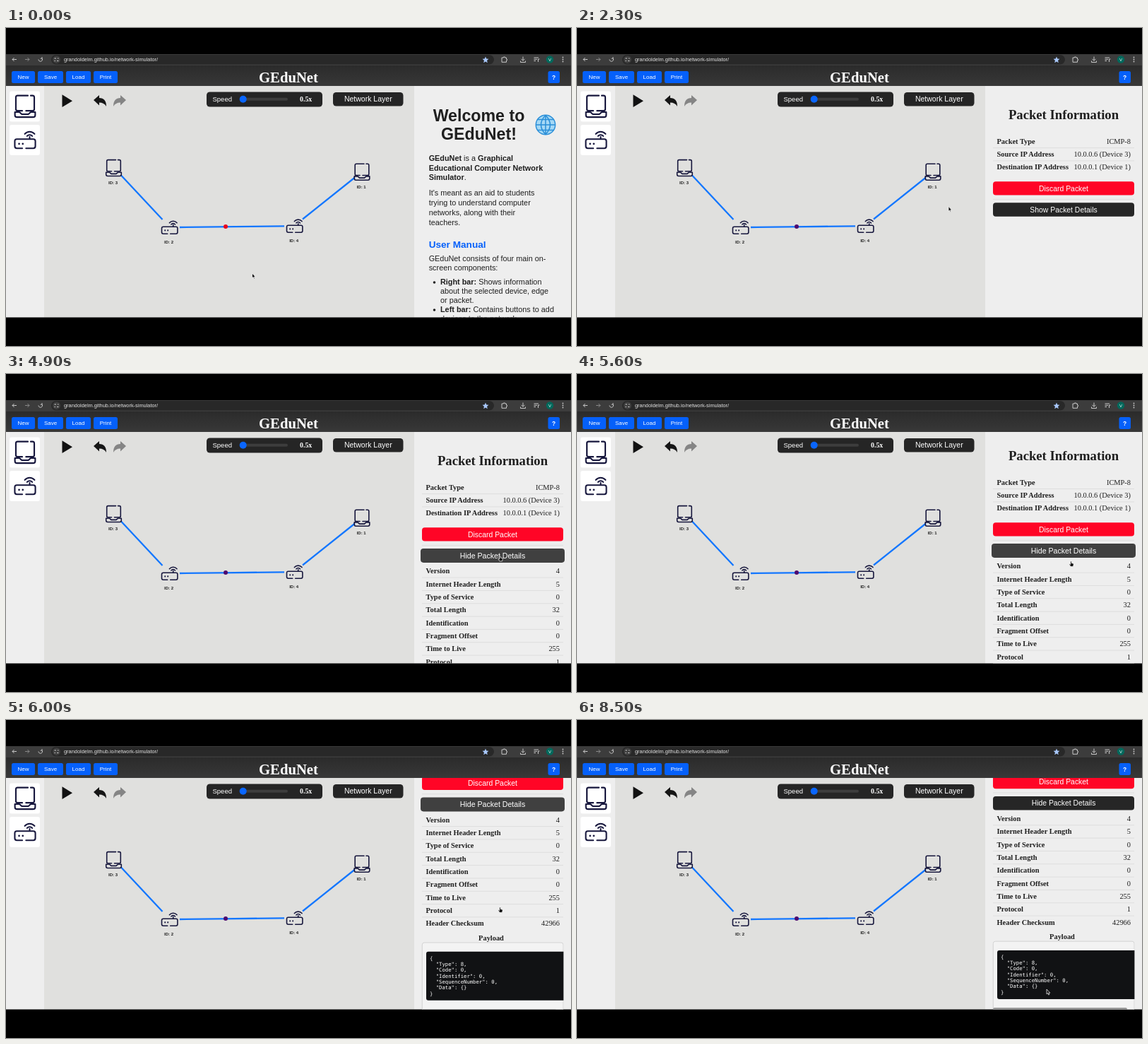
Animation of 800 by 450 pixels, one loop 9700 ms. Source, as an HTML page:

```html
<!DOCTYPE html>
<html lang="en">
<head>
<meta charset="utf-8">
<title>Network simulator</title>
<style>
  html, body { margin: 0; width: 100%; height: 100%; overflow: hidden; background: #000; }
  svg { display: block; width: 800px; height: 450px; }
  text { font-family: "Liberation Sans", Arial, sans-serif; font-size: 10.4px; fill: #1f1f1f; white-space: pre; }
  .serif { font-family: "Liberation Serif", "Times New Roman", serif; }
  .mono { font-family: "DejaVu Sans Mono", monospace; font-size: 7.25px; fill: #fff; }
  .bold { font-weight: bold; }
  .mid { text-anchor: middle; }
  .end { text-anchor: end; }
  .white { fill: #fff; }
  .body { font-size: 10.85px; }
  .icon { fill: none; stroke: #17173d; stroke-width: 1.6; stroke-linecap: round; stroke-linejoin: round; }
  .chrome { fill: none; stroke: #c7c7c7; stroke-width: 1; }
  .rule { stroke: #dadada; stroke-width: .8; }
</style>
</head>
<body>
<svg id="stage" viewBox="0 0 800 450">
  <defs>
    <linearGradient id="head" x2="0" y2="1">
      <stop stop-color="#2b2b2b"/><stop offset="1" stop-color="#383838"/>
    </linearGradient>
    <clipPath id="panelClip"><path d="M578 82H800V409.5H578Z"/></clipPath>
    <clipPath id="payloadClip"><path d="M588 440H789.4V560H588Z"/></clipPath>
    <g id="computer" class="icon">
      <path d="M-3 4.8H-8Q-9.8 4.8-9.8 3V-9.5Q-9.8-11.4-8-11.4H3M6-11.4H8Q9.8-11.4 9.8-9.5V3Q9.8 4.8 8 4.8H1"/>
      <path d="M-10.8 6.2H-6L-3.5 8.4H3.5L6 6.2H10.8V9.3Q10.8 11.5 8.6 11.5H-8.6Q-10.8 11.5-10.8 9.3Z"/>
    </g>
    <g id="router" class="icon">
      <path d="M-3 9H-9Q-11.2 9-11.2 6.8V1.2Q-11.2-1-9-1H9Q11.2-1 11.2 1.2V6.8Q11.2 9 9 9H1M5-1V-3.5"/>
      <path d="M2.2-4.3A3.6 3.6 0 0 1 7.8-4.3M-.3-6.6A7 7 0 0 1 10.3-6.6"/>
      <path d="M-6.5 4V4.2M-2.5 4V4.2" stroke-width="2"/>
    </g>
  </defs>
  <g id="app"></g>
  <g clip-path="url(#panelClip)">
    <path d="M578 82H800V410H578Z" fill="#eee"/>
    <g id="welcome"></g>
    <g id="packetInfo"></g>
  </g>
  <g id="cursor" stroke="#fff" stroke-width=".7" fill="#111" stroke-linejoin="round">
    <path id="arrow" d="M0 0V6.8L1.6 5.5L2.7 8L3.8 7.5L2.7 5.2H4.8Z"/>
    <path id="hand" d="M-.8 .6Q0-.6 .8 .6V2.6L3.6 3.2Q4 5.5 2.9 7.4H-.6L-2.6 4.2L-2 3.6L-.8 4.6Z"/>
  </g>
</svg>
<script>
const LOOP = 9700, STEP = 100;
const $ = id => document.getElementById(id);
const text = (x, y, str, cls = '', size) =>
  `<text x="${x}" y="${y}" class="${cls}"${size ? ` style="font-size:${size}px"` : ''}>${str}</text>`;
const box = (x, y, w, h, fill, r = 0, extra = '') =>
  `<rect x="${x}" y="${y}" width="${w}" height="${h}" rx="${r}" fill="${fill}" ${extra}/>`;
const path = (d, attrs) => `<path d="${d}" ${attrs}/>`;
const dot = (x, y, r, fill, extra = '') => `<circle cx="${x}" cy="${y}" r="${r}" fill="${fill}" ${extra}/>`;
const icon = (name, x, y, scale = 1) => `<use href="#${name}" transform="translate(${x} ${y}) scale(${scale})"/>`;
const rule = y => path(`M589 ${y}H789`, 'class="rule"');
const button = (x, w, label) =>
  box(x, 61, w, 17, '#0560fa', 2.5) + text(x + w / 2, 72.4, label, 'white mid', 8);

function browserBar() {
  return box(0, 37, 800, 16, '#3c3c3c') + box(64, 38, 627, 13.5, '#282828', 6.7) +
    path('M15 44.5H9M11.5 42L9 44.5L11.5 47M46 44.5A2.8 2.8 0 1 0 51 42.7V41M51 43.2H48.8', 'class="chrome"') +
    path('M27 44.5H33M30.5 42L33 44.5L30.5 47', 'class="chrome" style="stroke:#888"') +
    dot(71.5, 44.7, 5.5, '#3f3f3f') +
    path('M68.5 43H71M73 43H74.5M68.5 46.5H70M72 46.5H74.5', 'class="chrome"') +
    text(82, 47.3, 'grandoldelm.github.io/network-simulator/', '', '7.4" fill="#e3e3e3').replace('px"', '"').replace('7.4"', '7.4px;fill:#e3e3e3"').replace(' fill="#e3e3e3"', '') +
    path('M679 40.5L680.3 43.5L683.4 43.8L681 46L681.8 49.2L679 47.5L676.2 49.2L677 46L674.6 43.8L677.7 43.5Z', 'fill="#a8c7fa"') +
    path('M702 42H704.5V41H706.5V42H708.5V44H709.3V46H708.5V48.3H702ZM732 40.5V46M729.5 43.8L732 46.3L734.5 43.8M728.5 46.5V48.5H735.5V46.5M747.5 42H754M747.5 44.3H752M747.5 46.5H750M753.5 48V44H755.5', 'class="chrome"') +
    dot(770, 44.5, 5.2, '#00695c') + text(770, 46.7, 'V', 'white mid', 6) +
    [41.5, 44.5, 47.5].map(y => dot(788.5, y, .9, '#c7c7c7')).join('');
}

function header() {
  return box(0, 53, 800, 29, 'url(#head)') + button(8, 33, 'New') + button(45, 36, 'Save') +
    button(85, 35, 'Load') + button(124, 34, 'Print') +
    box(767.5, 61, 16.5, 17, '#0560fa', 2.5) + text(775.7, 72.6, '?', 'white bold mid', 8.5) +
    text(400, 76.7, 'GEduNet', 'serif bold mid white', 20.7);
}

function controls() {
  const undo = 'M124 102L132 95V99Q142 99 142 111Q139 105.5 132 105.5V109.5Z';
  return path('M79.5 94.3V112L94 103.2Z', 'fill="#111"') + path(undo, 'fill="#161616"') +
    path(undo, 'fill="#858585" transform="matrix(-1 0 0 1 294 0)"') +
    box(284, 90.5, 164, 21, '#252525', 4.5) + text(292.5, 104, 'Speed', 'white', 9.5) +
    box(331, 98.7, 68, 4, '#3d3d3d', 2) + dot(335.7, 100.7, 5, '#0a66ff') +
    text(416, 104, '0.5x', 'serif bold white', 9.9) +
    box(463, 91, 99.5, 19.5, '#252525', 4.5) + text(512.8, 104.3, 'Network Layer', 'white mid', 10.5);
}

function network() {
  const label = (x, y, id) => text(x, y, 'ID: ' + id, 'bold mid', 6);
  return path('M163 208.5L221.5 271M246 282L394 280.3M420 270.5L494 211.5', 'stroke="#1477ff" stroke-width="2.3"') +
    icon('computer', 152.5, 198) + icon('computer', 504, 203.7) +
    icon('router', 231.7, 282.3) + icon('router', 408.7, 280.2) +
    label(151.5, 220.7, 3) + label(503.2, 226.5, 1) + label(230.5, 304.7, 2) + label(407.7, 302.7, 4) +
    dot(311, 281, 3, '#e8001c', 'id="packet"');
}

$('app').innerHTML = browserBar() + header() + box(0, 82, 54, 327.5, '#eee') +
  box(54, 82, 524, 327.5, '#e0e0de') +
  box(5, 89.5, 43, 43, '#fff', 3) + box(5, 137, 43, 43, '#fff', 3) +
  icon('computer', 27, 110.8, 1.33) + icon('router', 27, 158.5, 1.3) + controls() + network();

const lines = (x, y, step, cls, ...rows) => rows.map((row, i) => text(x, y + i * step, row, cls)).join('');
const strong = s => `<tspan class="bold">${s}</tspan>`;

$('welcome').innerHTML =
  text(669.5, 131.7, 'Welcome to', 'bold mid', 23.2) + text(669.5, 158, 'GEduNet!', 'bold mid', 23.2) +
  dot(764, 137, 13.7, '#a5d8f5', 'stroke="#2b8fd8" stroke-width="1.5"') +
  path('M764 123.5V150.5M750.5 137H777.5M753 129.5H775M753 144.5H775M764 123.5Q751 137 764 150.5Q777 137 764 123.5', 'fill="none" stroke="#2b8fd8" stroke-width="1.5"') +
  lines(598.7, 187.6, 13.9, 'body', strong('GEduNet') + ' is a ' + strong('Graphical'),
    strong('Educational Computer Network'), strong('Simulator') + '.') +
  lines(598.7, 237, 13.9, 'body', "It's meant as an aid to students", 'trying to understand computer',
    'networks, along with their', 'teachers.') +
  `<g style="--c:#0560fa">${text(598.7, 311, 'User Manual', 'bold', 13.6).replace('px"', 'px;fill:var(--c)"')}</g>` +
  lines(598.7, 329.5, 13, 'body', 'GEduNet consists of four main on-', 'screen components:') +
  dot(606.5, 360, 1.8, '#1f1f1f') + dot(606.5, 399, 1.8, '#1f1f1f') +
  lines(615, 363.4, 13, 'body', strong('Right bar:') + ' Shows information', 'about the selected device, edge',
    'or packet.', strong('Left bar:') + ' Contains buttons to add', 'devices to the network.');

const table = (y, rows) => rows.map(([name, value], i) => {
  const base = y + i * 18.33;
  return text(594.5, base, name, 'serif bold') + text(784, base, value, 'serif end') +
    (i < rows.length - 1 ? rule(base + 5.8) : '');
}).join('');
const code = ['{', '  "Type": 8,', '  "Code": 0,', '  "Identifier": 0,', '  "SequenceNumber": 0,', '  "Data": {}', '}'];

$('packetInfo').innerHTML =
  text(689, 129, 'Packet Information', 'serif bold mid', 18.7) +
  table(163.8, [['Packet Type', 'ICMP-8'], ['Source IP Address', '10.0.0.6 (Device 3)'],
    ['Destination IP Address', '10.0.0.1 (Device 1)']]) +
  box(589, 217.3, 200, 19.3, '#ff0526', 4) + text(689, 230.6, 'Discard Packet', 'white mid') + rule(242.3) +
  `<g id="toggle">${box(589, 247.3, 200, 19.4, '#262626', 4, 'id="toggleFace"')}
    <text id="toggleLabel" x="689" y="260.6" class="white mid"></text></g>
  <g id="details">` +
  table(282.3, [['Version', 4], ['Internet Header Length', 5], ['Type of Service', 0], ['Total Length', 32],
    ['Identification', 0], ['Fragment Offset', 0], ['Time to Live', 255], ['Protocol', 1],
    ['Header Checksum', 42966]]) +
  text(687, 449, 'Payload', 'serif bold mid') +
  `<g clip-path="url(#payloadClip)">${box(589.3, 452.5, 199.7, 99, '#f3f3f3', 3, 'stroke="#ccc" stroke-width=".8"')}
    ${box(595, 465.3, 230, 69, '#111214', 3)}${lines(600, 477, 8.35, 'mono', ...code)}
    ${box(589, 546.5, 190, 5, '#8b8b8b', 2)}</g></g>`;

// Rows of [time, ...values], joined by straight lines.
const pointerKeys = [
  [100, 348.5, 347], [1000, 311, 279], [1700, 311, 279], [2300, 526, 252.5], [2600, 570, 252],
  [3300, 782, 152], [3700, 784, 170], [4100, 770, 195], [4500, 699.5, 257.5], [5200, 699.5, 257.5],
  [5400, 699.5, 265], [6500, 699.5, 265], [7500, 668, 377], [7600, 666, 378], [7700, 666, 378], [7900, 665, 381]
];
const scrollKeys = [[5500, 0], [5600, 7], [5700, 55], [5800, 102.5], [5900, 127], [6000, 137.5], [6100, 139.3]];

function sample(keys, t) {
  const next = keys.findIndex(k => k[0] > t);
  if (next === 0) return keys[0].slice(1);
  if (next < 0) return keys[keys.length - 1].slice(1);
  const a = keys[next - 1], b = keys[next], u = (t - a[0]) / (b[0] - a[0]);
  return a.slice(1).map((v, i) => v + (b[i + 1] - v) * u);
}
const show = (id, on) => $(id).setAttribute('visibility', on ? 'visible' : 'hidden');

function draw(now) {
  const t = Math.floor(now % LOOP / STEP) * STEP;
  const selected = t >= 1700, open = t >= 4800, hover = t >= 4500 && t < 6600;
  const [x, y] = sample(pointerKeys, t), [scroll] = sample(scrollKeys, t);
  show('welcome', !selected);
  show('packetInfo', selected);
  show('details', selected && open);
  $('packet').setAttribute('fill', selected ? '#4d0a6e' : '#e8001c');
  $('packetInfo').setAttribute('transform', `translate(0 ${-scroll})`);
  $('toggle').setAttribute('transform', hover ? 'translate(689 257) scale(1.02) translate(-689 -257)' : '');
  $('toggleFace').setAttribute('fill', hover ? '#404040' : '#262626');
  $('toggleLabel').textContent = (open ? 'Hide' : 'Show') + ' Packet Details';
  const pointing = hover || t >= 1000 && t <= 1700;
  show('hand', pointing);
  show('arrow', !pointing);
  $('cursor').setAttribute('transform', `translate(${x} ${y})`);
  requestAnimationFrame(draw);
}
requestAnimationFrame(draw);
</script>
</body>
</html>
```
